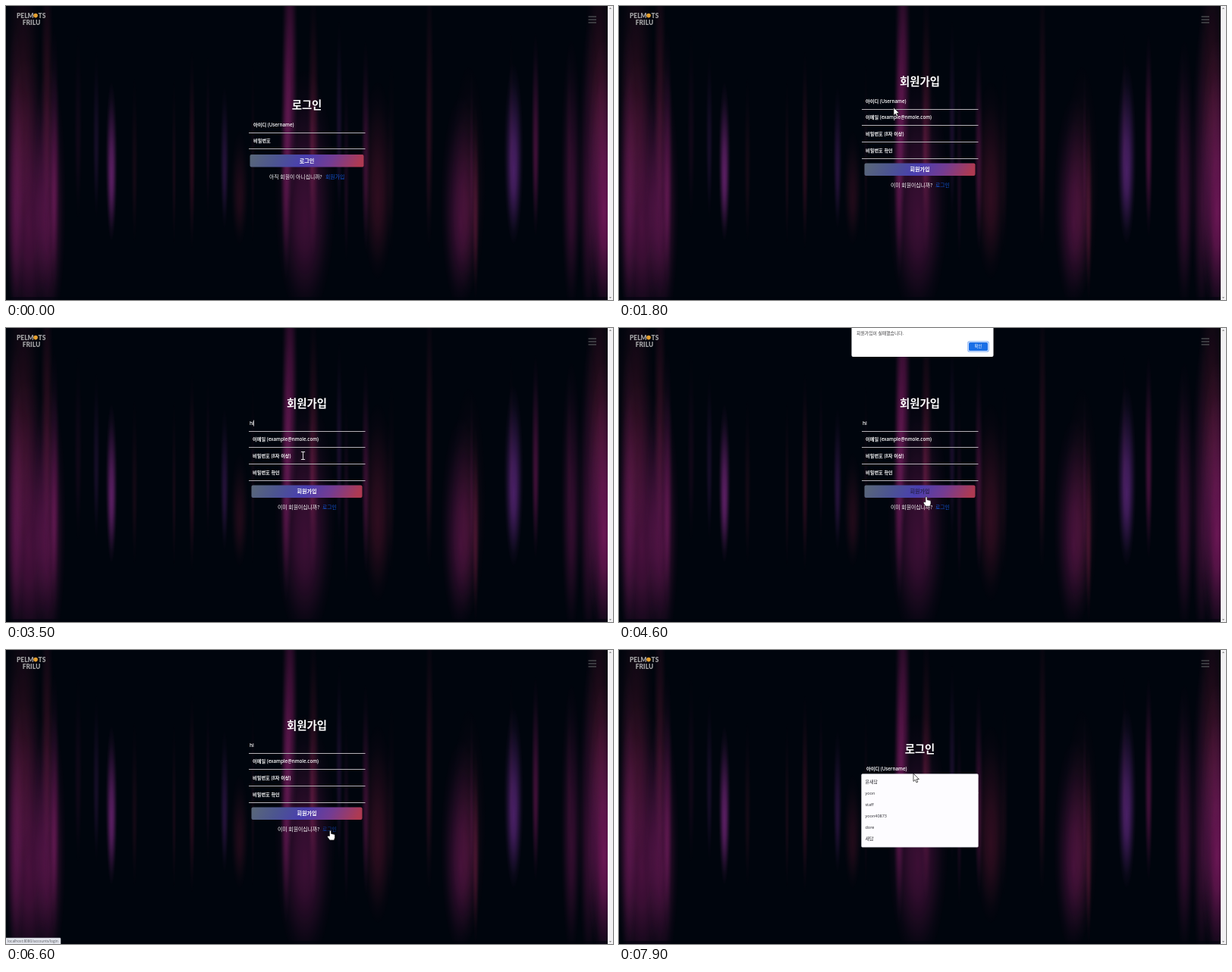
Animation of 800 by 388 pixels, one loop 8000 ms. Source, as an HTML page:

```html
<!DOCTYPE html>
<html lang="ko">
<head>
<meta charset="utf-8">
<title>Login and sign-up</title>
<style>
html, body { margin: 0; width: 100%; height: 100%; overflow: hidden; background: #00050d; }
svg { display: block; width: 100vw; height: 100vh; }
text { font-family: "Open Sans", "Noto Sans CJK KR", "Noto Sans CJK", "Noto Sans", sans-serif; white-space: pre; }
.logo { font-family: Lato, sans-serif; font-weight: 900; }
#glow ellipse { mix-blend-mode: screen; }
</style>
</head>
<body>
<svg id="stage" viewBox="0 0 800 388" xmlns="http://www.w3.org/2000/svg">
  <defs id="defs">
    <linearGradient id="btn" x1="0" y1="0" x2="1" y2=".06">
      <stop offset="0" stop-color="#5a6878"/>
      <stop offset=".25" stop-color="#4c5590"/>
      <stop offset=".5" stop-color="#4a3fb0"/>
      <stop offset=".75" stop-color="#743c92"/>
      <stop offset="1" stop-color="#ae3a52"/>
    </linearGradient>
    <clipPath id="page"><rect width="793" height="388"/></clipPath>
  </defs>
  <rect width="800" height="388" fill="#00050d"/>
  <g id="glow" clip-path="url(#page)"></g>
  <g id="chrome"></g>
  <g id="login"></g>
  <g id="signup"></g>
  <g id="popup"></g>
  <g id="dialog"></g>
  <g id="status"></g>
  <g id="pointer"></g>
</svg>
<script>
const NS = "http://www.w3.org/2000/svg";
const LOOP = 8000, STEP = 100;
const $ = id => document.getElementById(id);

function add(parent, tag, attrs, content) {
  const node = document.createElementNS(NS, tag);
  for (const key in attrs) node.setAttribute(key, attrs[key]);
  if (content !== undefined) node.textContent = content;
  parent.appendChild(node);
  return node;
}
const rect = (g, x, y, width, height, fill, more) =>
  add(g, "rect", { x, y, width, height, fill, ...more });
// cy is the visual middle of the line
const label = (g, x, cy, size, fill, content, more) =>
  add(g, "text", { x, y: cy + size * 0.36, "font-size": size, fill, ...more }, content);
const mid = { "text-anchor": "middle" };
const bold = { ...mid, "font-weight": 700 };
const medium = { "font-weight": 600 };
const show = (node, on) => node.setAttribute("visibility", on ? "visible" : "hidden");
const display = (node, on) => node.setAttribute("display", on ? "inline" : "none");

// Light streaks: x, y, half width, half height, strength
const tints = { magenta: "#8e1c6c", purple: "#6c2c90", red: "#5c1632" };
const streaks = {
  magenta: [
    [12, 230, 12, 200, .36], [30, 255, 36, 185, .5], [57, 255, 22, 175, .45],
    [64, 200, 7, 170, .36], [374, 70, 11, 190, .52], [369, 190, 8, 170, .5],
    [394, 250, 40, 165, .42], [474, 185, 6, 140, .34], [599, 260, 26, 140, .42],
    [698, 170, 6, 135, .45], [745, 225, 14, 180, .36], [768, 225, 14, 200, .36],
    [788, 235, 22, 190, .75], [139, 205, 8, 105, .36]
  ],
  purple: [
    [139, 205, 8, 105, .45], [288, 200, 6, 95, .34], [669, 195, 13, 120, .68],
    [439, 150, 5, 130, .22], [119, 170, 5, 110, .2]
  ],
  red: [
    [22, 110, 24, 190, .42], [54, 100, 9, 180, .42], [245, 190, 5, 130, .42],
    [405, 150, 8, 180, .5], [490, 230, 22, 130, .5], [558, 130, 6, 190, .34],
    [610, 230, 22, 150, .3], [619, 260, 5, 130, .5], [782, 90, 20, 170, .45],
    [308, 240, 12, 75, .35]
  ]
};

function buildGlow() {
  const g = $("glow");
  const blob = (tint, [cx, cy, rx, ry, opacity]) =>
    add(g, "ellipse", { cx, cy, rx, ry, opacity, fill: `url(#${tint})` });
  for (const tint in tints) {
    // the low focus gives each streak a long upper tail
    const grad = add($("defs"), "radialGradient", { id: tint, fy: .6 });
    [[0, 1], [.3, .8], [.6, .4], [.82, .12], [1, 0]].forEach(([offset, alpha]) =>
      add(grad, "stop", { offset, "stop-color": tints[tint], "stop-opacity": alpha }));
    streaks[tint].forEach(s => blob(tint, s));
  }
  let seed = 17;
  const rnd = () => (seed = seed * 16807 % 2147483647) / 2147483647;
  for (let i = 0; i < 12; i++)
    blob(i % 3 ? "red" : "magenta",
      [95 + i * 57 + rnd() * 24, 140 + rnd() * 80, 3 + rnd() * 3, 80 + rnd() * 50, .1 + rnd() * .12]);
  rect(g, 0, 384, 793, 4, "#00050d", { opacity: .55 });
}

function buildChrome() {
  const g = $("chrome");
  const grey = "#a0a0a2", logo = { class: "logo" };
  label(g, 14, 12.8, 8.4, grey, "PELM", logo);
  add(g, "circle", { cx: 39, cy: 12.6, r: 2.8, fill: "#e5a030" });
  label(g, 42.6, 12.8, 8.4, grey, "TS", logo);
  label(g, 33.5, 21.8, 8.4, grey, "FRILU", { ...logo, ...mid });
  [13.4, 17.3, 21.2].forEach(y => rect(g, 767.5, y, 10.5, 1.4, "#4c4e52"));
  rect(g, 793, 0, 7, 388, "#f2f1f3");
  add(g, "path", { d: "M795 4L796.5 2L798 4ZM795 384L796.5 386L798 384Z", fill: "#8d8d8d" });
}

const hint = (g, x, y, content) => label(g, x, y, 6.2, "#fff", content, medium);
const line = (g, y) => rect(g, 320, Math.round(y - .5), 153.5, 1, "#b4b1b6");

function buildForm(g, f) {
  label(g, 396.5, f.titleY, 14.4, "#fff", f.title, bold);
  const hints = f.hints.map((content, i) => {
    line(g, f.lineY + i * 21.6);
    return hint(g, f.hintX, f.lineY - 10.6 + i * 21.6, content);
  });
  rect(g, f.btnX, f.btnY, 793 - 2 * f.btnX, 16.5, "url(#btn)", { rx: 2 });
  const action = label(g, 396.5, f.btnY + 8.4, 7.1, "#fff", f.title, bold);
  label(g, f.askX, f.askY, 6.85, "#fff", f.ask, { "font-weight": 500 });
  const link = label(g, f.linkX, f.askY, 6.85, "#1456d8", f.link, { "font-weight": 500 });
  return { hints, action, link };
}

const caretAt = (g, y) => rect(g, 321, y - 4, .7, 8, "#fff");

buildGlow();
buildChrome();
buildForm($("login"), {
  title: "로그인", titleY: 131, hints: ["아이디 (Username)", "비밀번호"], hintX: 326, lineY: 167.2,
  btnX: 321.5, btnY: 196, ask: "아직 회원이 아니십니까?", askX: 347, askY: 226, link: "회원가입", linkX: 421
});
const loginCaret = caretAt($("login"), 156.5);

const signup = buildForm($("signup"), {
  title: "회원가입", titleY: 100, hintX: 325, lineY: 136.2,
  hints: ["아이디 (Username)", "이메일 (example@nmole.com)", "비밀번호 (8자 이상)", "비밀번호 확인"],
  btnX: 323.5, btnY: 207.5, ask: "이미 회원이십니까?", askX: 358, askY: 237, link: "로그인", linkX: 417
});
const fill = rect($("signup"), 320, 119.5, 153.5, 12, "#e8f0fe");
const typed = label($("signup"), 321, 125.6, 6.4, "#fff", "", medium);
const signCaret = caretAt($("signup"), 125.6);

// Suggestion list, drawn at y = 0 and moved under the field
const names = ["윤새담", "yoon", "staff", "yoon40873", "dore", "새담"];
const popup = $("popup");
rect(popup, 319.5, 0, 154, 96.6, "#fdfcff", { rx: 1.5, stroke: "#c8c8d0", "stroke-width": .4 });
const rowMark = rect(popup, 319.8, 0, 153.4, 15, "#dcdbdd");
names.forEach((name, i) =>
  label(popup, 324.5, 10.5 + i * 15, /[a-z]/.test(name) ? 5.5 : 6, "#28282e", name));

const dialog = $("dialog");
add(dialog, "path", { d: "M306.5 0H493.5V36Q493.5 38 491.5 38H308.5Q306.5 38 306.5 36Z", fill: "#fff" });
label(dialog, 313, 7, 5.85, "#3a3a3c", "회원가입이 실패했습니다.");
rect(dialog, 459.8, 17.8, 27.4, 13.4, "#fff", { rx: 2.2, stroke: "#8fb6f4", "stroke-width": 1.2 });
const okBtn = rect(dialog, 461, 19, 25, 11, "#1a6fe6", { rx: 1.6 });
label(dialog, 473.5, 24.4, 5.4, "#fff", "확인", mid);

const status = $("status");
rect(status, -1, 380, 73, 9, "#e3e5ec", { rx: 1, stroke: "#b9bcc6", "stroke-width": .5 });
label(status, 2, 384.4, 4.8, "#55585f", "localhost:8080/accounts/login");

const outline = { fill: "#fff", stroke: "#111", "stroke-width": .7, "stroke-linejoin": "round" };
const pointers = {
  arrow: add($("pointer"), "path", { ...outline,
    d: "M0 0V10.4L2.4 8.2L4 11.9L5.8 11.1L4.2 7.5H7.4Z" }),
  hand: add($("pointer"), "path", { ...outline,
    d: "M-1.1 7.5V1Q0 -.6 1.1 1V4.4L4.9 5.2Q6 5.6 6 6.8V9.5L5 13H-.8L-3.9 8.7Q-4 7.2 -2.6 7.2Z" }),
  beam: add($("pointer"), "path", { fill: "none", stroke: "#f4f4f4", "stroke-width": .9,
    d: "M-2.6 -5H2.6M0 -5V5M-2.6 5H2.6" })
};

// time, x, y, shape from that time on
const path = [
  [100, 45, 10, "arrow"], [300, 429, 217, "arrow"], [400, 429, 217, "arrow"],
  [500, 431, 224, "hand"], [800, 431, 226, "arrow"], [1400, 430, 227, "arrow"],
  [1600, 406, 186, "arrow"], [1800, 362, 134, "arrow"], [1900, 372, 127, "beam"],
  [2000, 384, 126, "beam"], [2400, 384, 126, "beam"], [2500, 388, 155, "arrow"],
  [2600, 390.5, 168, "arrow"], [3200, 391.5, 168.5, "beam"], [3700, 391.5, 168.5, "beam"],
  [3900, 394, 184, "arrow"], [4100, 401, 209, "hand"], [4300, 405, 222.3, "hand"],
  [4600, 405, 222.3, "hand"], [4700, 410, 210, "arrow"], [5000, 462, 110, "arrow"],
  [5200, 488, 52, "arrow"], [5500, 478, 21, "arrow"], [6100, 478, 21, "arrow"],
  [6300, 458, 115, "arrow"], [6500, 430, 232, "hand"], [6600, 427.5, 238, "hand"],
  [6800, 427.5, 238, "arrow"], [6900, 427.5, 238, "arrow"], [7200, 402, 186, "arrow"],
  [7400, 389, 160, "beam"], [7600, 388, 163, "arrow"], [LOOP, 388, 163, "arrow"]
];

function movePointer(t) {
  const next = path.findIndex(p => p[0] > t);
  display($("pointer"), next > 0);
  if (next < 1) return;
  const [t0, x0, y0, shape] = path[next - 1], [t1, x1, y1] = path[next];
  const k = (t - t0) / (t1 - t0);
  $("pointer").setAttribute("transform", `translate(${x0 + (x1 - x0) * k} ${y0 + (y1 - y0) * k})`);
  for (const name in pointers) display(pointers[name], name === shape);
}

function render(now) {
  const t = Math.floor((now % LOOP) / STEP) * STEP;
  const within = (a, b) => t >= a && t < b;
  const onSignup = within(800, 6800);
  const preview = within(2500, 3200);
  display($("login"), !onSignup);
  display($("signup"), onSignup);

  const entry = preview ? names[t < 2800 ? 1 : 2] : t < 3200 ? "" : t < 3400 ? "h" : "hi";
  typed.textContent = entry;
  typed.setAttribute("fill", preview ? "#17181c" : "#fff");
  typed.setAttribute("font-size", preview ? 5.6 : 6.4);
  show(signup.hints[0], !entry);
  show(fill, preview);
  show(signCaret, within(2200, 2500) || within(3200, 3900));
  signCaret.setAttribute("x", 321 + (t < 3200 ? 0 : t < 3400 ? 3.6 : 5.3));
  show(loginCaret, within(7400, 7900));
  signup.action.setAttribute("fill", within(4100, 6100) ? "#2c2456" : "#fff");
  signup.link.setAttribute("fill", within(6500, 6800) ? "#0d3c9c" : "#1456d8");

  display(popup, within(2200, 3200) || t >= 7500);
  popup.setAttribute("transform", `translate(0 ${t < 5000 ? 132.6 : 163.6})`);
  show(rowMark, preview);
  rowMark.setAttribute("y", t < 2600 ? 18 : 33);

  display(dialog, within(4500, 6100));
  okBtn.setAttribute("fill", t >= 5600 ? "#3b82ea" : "#1a6fe6");
  display(status, within(6500, 7000));
  movePointer(t);
}

const start = performance.now();
function tick() {
  render(performance.now() - start);
  requestAnimationFrame(tick);
}
tick();
</script>
</body>
</html>
```
